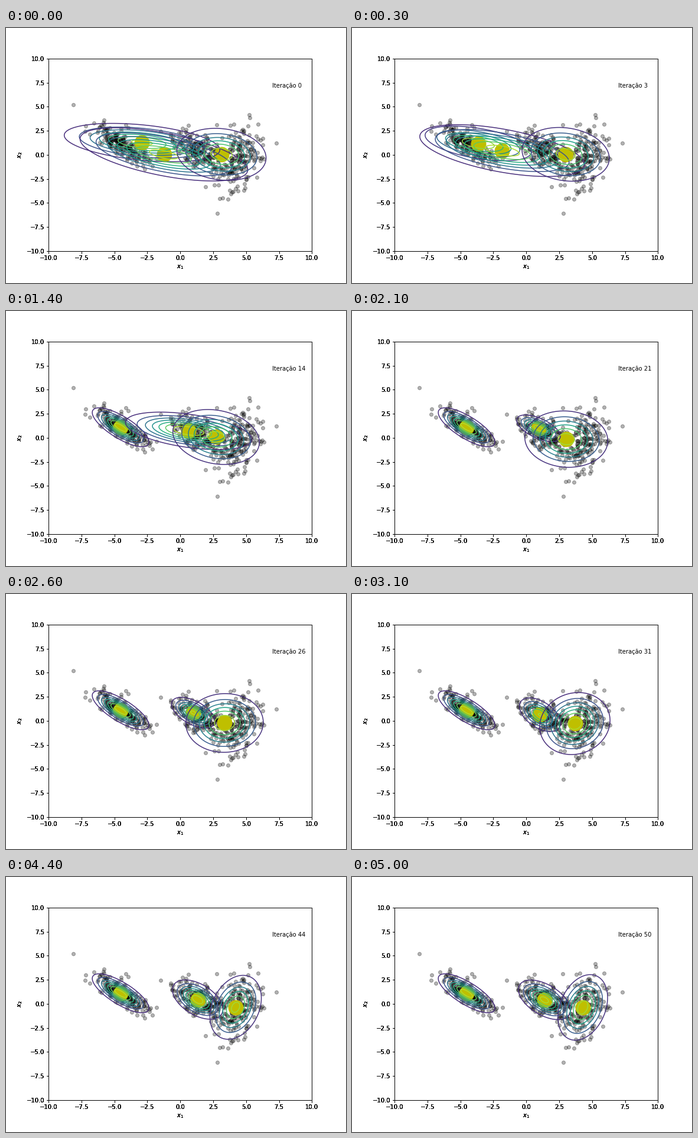
A matplotlib script that plays this animation: 576x432 px, repeating every 5.1 s.

```python
import numpy as np
import matplotlib.pyplot as plt
from matplotlib.animation import FuncAnimation

N_ITER = 51
BOX = [0.125, 0.125, 0.775, 0.755]

# Rows: iteration, mean x, mean y, sigma x, sigma y, correlation
LEFT = np.array([
    [0, -2.90, 1.28, 2.966, 0.999, -0.38],
    [7, -4.35, 1.10, 1.335, 0.921, -0.60],
    [14, -4.53, 1.10, 1.065, 1.002, -0.76],
    [50, -4.53, 1.10, 1.065, 1.002, -0.76],
])
MIDDLE = np.array([
    [0, -1.24, 0.05, 3.178, 1.378, -0.58],
    [7, -2.34, 0.79, 2.970, 1.260, -0.50],
    [14, 0.64, 0.73, 2.360, 0.955, -0.45],
    [21, 0.93, 1.00, 0.857, 0.713, -0.60],
    [31, 1.04, 0.64, 0.820, 0.920, -0.50],
    [39, 1.25, 0.485, 0.905, 0.990, -0.48],
    [50, 1.38, 0.42, 0.986, 1.027, -0.52],
])
RIGHT = np.array([
    [0, 3.13, 0.055, 1.735, 1.384, -0.14],
    [7, 2.84, 0.055, 1.680, 1.485, -0.17],
    [14, 2.72, 0.09, 1.700, 1.477, -0.19],
    [21, 3.04, -0.13, 1.630, 1.515, -0.06],
    [31, 3.69, -0.28, 1.328, 1.603, 0.10],
    [39, 4.09, -0.34, 1.075, 1.697, 0.27],
    [50, 4.29, -0.37, 0.973, 1.760, 0.30],
])
COMPONENTS = [LEFT, MIDDLE, RIGHT]

OUTLIERS = np.array([
    [-8.12, 5.2], [-7.18, 3.0], [-7.22, 2.45], [-6.86, 2.15],
    [-5.79, 3.6], [-5.83, 3.35], [-4.13, 3.1], [-3.95, 2.8],
    [-4.5, 2.75], [-1.49, 2.45], [-1.8, -0.38], [-2.11, -1.17],
    [-2.7, -1.45], [-3.28, -1.17], [0.62, 3.05], [2.77, 3.1],
    [3.8, 3.07], [5.23, 4.17], [5.28, 3.87], [5.9, 3.18],
    [7.3, 1.22], [6.35, -0.43], [6.22, -0.25], [5.82, -2.33],
    [2.82, -6.08], [1.92, -3.3], [3.0, -4.55], [3.22, -4.48],
    [3.62, -4.6], [3.84, -4.05], [3.75, -3.7],
])


def monotone(table, t):
    """Shape-preserving cubic interpolation of every column at time t."""
    x, y = table[:, 0], table[:, 1:]
    h = np.diff(x)[:, None]
    d = np.diff(y, axis=0) / h
    m = np.vstack([d[:1], np.zeros_like(d[1:]), d[-1:] * 0.6])
    prod = d[:-1] * d[1:]
    total = d[:-1] + d[1:]
    ok = prod > 0
    m[1:-1][ok] = 2 * prod[ok] / total[ok]
    i = min(np.searchsorted(x, t, side="right") - 1, len(x) - 2)
    w = h[i, 0]
    u = (t - x[i]) / w
    return ((1 + 2 * u) * (1 - u) ** 2 * y[i] + u * (1 - u) ** 2 * w * m[i]
            + u * u * (3 - 2 * u) * y[i + 1] + u * u * (u - 1) * w * m[i + 1])


def density(x, y, mx, my, sx, sy, rho):
    a, b = (x - mx) / sx, (y - my) / sy
    q = 1 - rho ** 2
    peak = 1 / (2 * np.pi * sx * sy * np.sqrt(q))
    return peak * np.exp(-(a * a - 2 * rho * a * b + b * b) / (2 * q))


def cluster(rng, params, n, reach=2.3):
    """Gaussian sample without its far tail."""
    mx, my, sx, sy, rho = params
    z = rng.standard_normal((2 * n, 2))
    z = z[np.hypot(z[:, 0], z[:, 1]) < reach][:n]
    x = mx + sx * z[:, 0]
    y = my + sy * (rho * z[:, 0] + np.sqrt(1 - rho ** 2) * z[:, 1])
    return np.column_stack([x, y])


def make_axes(fig):
    ax = fig.add_axes(BOX, facecolor="none")
    ticks = np.arange(-10, 10.1, 2.5)
    ax.set(xlim=(-10, 10), ylim=(-10, 10), xticks=ticks, yticks=ticks,
           xlabel="$x_1$", ylabel="$x_2$")
    return ax


plt.rcParams.update({"font.family": "DejaVu Sans", "font.size": 10})
fig = plt.figure(figsize=(8, 6), dpi=72, facecolor="white")

# Stacked axes give the labels their heavy look
ax = [make_axes(fig) for _ in range(4)][-1]

rng = np.random.default_rng(4)
points = np.vstack([cluster(rng, c[-1, 1:], 190) for c in COMPONENTS]
                   + [OUTLIERS])
ax.plot(points[:, 0], points[:, 1], "ko", alpha=0.3, zorder=1)
means, = ax.plot([], [], "yo", markersize=25, zorder=1.5)
label = ax.text(7, 7, "")

grid_x, grid_y = np.meshgrid(np.linspace(-10, 10, 201),
                             np.linspace(-10, 10, 201))
contours = []


def update(i):
    while contours:
        contours.pop().remove()
    params = [monotone(c, i) for c in COMPONENTS]
    means.set_data([p[0] for p in params], [p[1] for p in params])
    for p in params:
        contours.append(ax.contour(grid_x, grid_y,
                                   density(grid_x, grid_y, *p)))
    label.set_text(f"Iteração {i}")


anim = FuncAnimation(fig, update, frames=N_ITER, interval=100,
                     init_func=lambda: None, repeat=True, repeat_delay=0)
plt.show()
```
